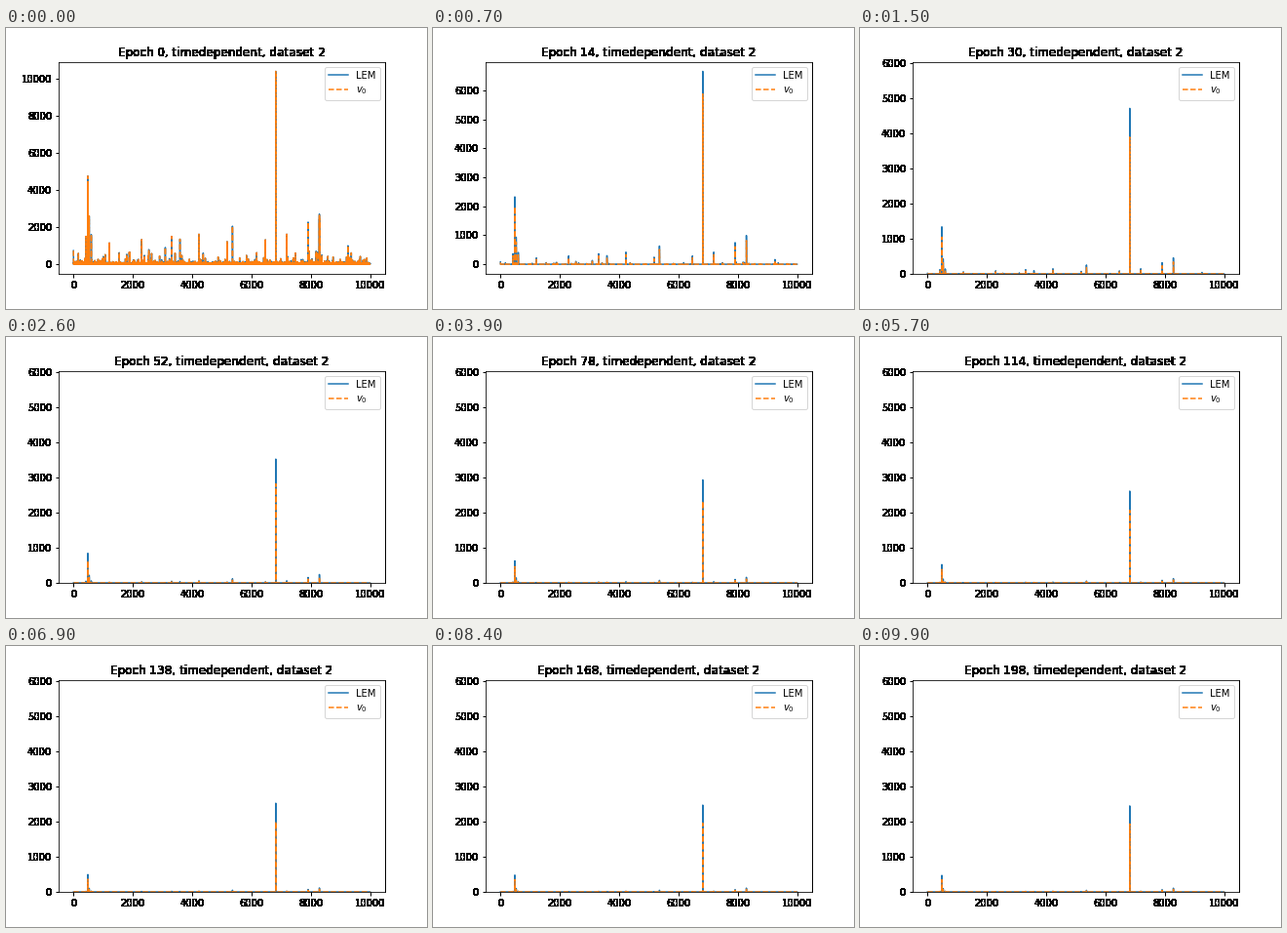
A matplotlib script for the animation above (10000 ms loop, 432 by 288 pixels).

```python
import numpy as np
import matplotlib.pyplot as plt
from matplotlib.animation import FuncAnimation

FRAMES, INTERVAL = 100, 100
FREEZE_EPOCH = 20          # from here on the y axis stays fixed
FIXED_TOP = 6040
PEAK = 10398

# position and starting height of the tallest spikes
SPIKES = {
    420: 1500, 485: 4750, 530: 2600, 600: 1600, 1210: 1150, 2300: 1330,
    3310: 1500, 3590: 1350, 4230: 1620, 5180: 1220, 5360: 2050, 6470: 1320,
    6820: PEAK, 7190: 1620, 7910: 2270, 8290: 2700,
}


def initial_heights():
    """Dense low noise, scattered small spikes and the tall ones."""
    rng = np.random.default_rng(2)
    h = np.minimum(rng.lognormal(2.75, 0.95, 10000), 480)
    small = rng.integers(0, h.size, 50)
    h[small] = np.minimum(250 + rng.exponential(220, small.size), 1000)
    for pos, height in SPIKES.items():
        h[pos] = height
        h[pos + 2] = 0.9 * height
    return h


start = initial_heights()
rate = (start / PEAK) ** -0.6      # lower values fade faster


def curves(epoch):
    lem = start * np.exp(-1.455 * (1 - np.exp(-epoch / 38.2)) * rate)
    gap = 0.21 * (1 - np.exp(-epoch / 17)) * np.sqrt(rate)
    return lem, lem * (1 - np.minimum(gap, 0.6))


def solid(image, dpi):
    """Turn every touched pixel into opaque black."""
    image = image.copy()
    image[..., :3] = 0
    image[..., 3] = image[..., 3] > 0
    return image, 0, 0


fig, ax = plt.subplots(figsize=(6, 4), dpi=72, facecolor="white")
fig.subplots_adjust(left=0.125, right=0.9, bottom=0.125, top=0.88)
lem_line, = ax.plot(start, label="LEM")
v0_line, = ax.plot(start, "--", label="$v_0$")
ax.set_xlim(-500, 10499)
ax.legend(loc="upper right")
ax.tick_params(width=1)

ticks = ax.xaxis.get_major_ticks(12) + ax.yaxis.get_major_ticks(12)
for artist in [ax.title, ax.spines.right, *(t.label1 for t in ticks)]:
    artist.set_agg_filter(solid)


def update(frame):
    epoch = 2 * frame
    lem, v0 = curves(epoch)
    lem_line.set_ydata(lem)
    v0_line.set_ydata(v0)
    if epoch < FREEZE_EPOCH:
        ax.set_ylim(-0.05 * lem.max(), 1.05 * lem.max())
    else:
        ax.set_ylim(0, FIXED_TOP)
    ax.set_title(f"Epoch {epoch}, timedependent, dataset 2")
    return lem_line, v0_line


anim = FuncAnimation(fig, update, frames=FRAMES, interval=INTERVAL,
                     repeat=True, repeat_delay=0)
plt.show()
```
